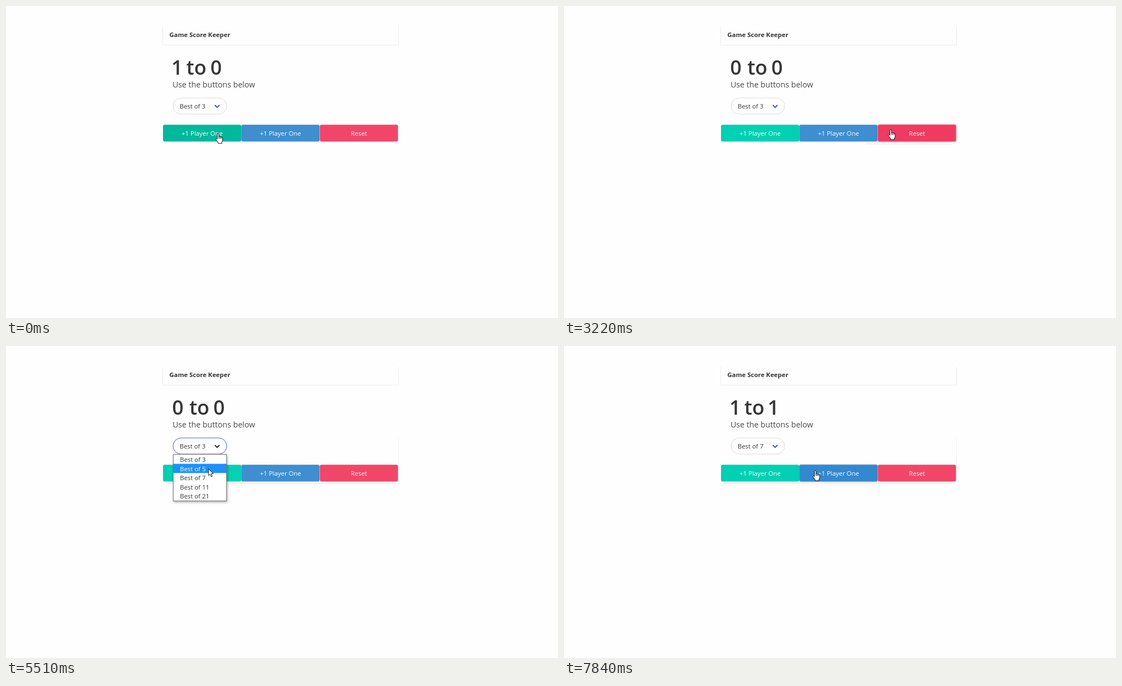
Write an HTML page that moves like this. It is 995x563 px and loops after 8 s.

```html
<!DOCTYPE html>
<html lang="en">
<head>
<meta charset="utf-8">
<title>Game Score Keeper</title>
<style>
html, body { margin: 0; height: 100%; overflow: hidden; background: #fefefe; }
svg { display: block; font-family: "Open Sans", "Noto Sans", sans-serif; font-size: 11.4px; fill: #363636; }
.title { font-size: 36px; font-weight: 600; }
.button text { fill: #fff; text-anchor: middle; }
.pointer { fill: #fff; stroke: #111; stroke-width: 1; stroke-linejoin: round; }
</style>
</head>
<body>
<svg id="stage" width="995" height="563" viewBox="0 0 995 563"></svg>
<script>
const LOOP = 8000;
const stage = document.getElementById('stage');

// Pointer positions: start time, x, y, shape; each holds until the next.
const path = [
  [0, 382.5, 230, 'hand'], [300, 384, 230, 'stop'], [1080, 394, 217, 'stop'],
  [1230, 436, 219, 'stop'], [1360, 497, 223, 'stop'], [1490, 556, 227, 'stop'],
  [1620, 594, 231, 'hand'], [1750, 605.5, 232.5, 'hand'], [3220, 589, 223, 'hand'],
  [3340, 540, 206, 'arrow'], [3480, 462, 190, 'arrow'], [3620, 404, 181, 'arrow'],
  [3750, 381, 178, 'hand'], [3880, 379, 178, 'arrow'], [4270, 377, 192, 'arrow'],
  [4390, 374, 207.5, 'arrow'], [4540, 371, 222, 'arrow'], [4690, 369, 240, 'arrow'],
  [4840, 368, 257, 'arrow'], [4980, 367, 267, 'arrow'], [5130, 366, 258, 'arrow'],
  [5270, 366, 243, 'arrow'], [5390, 365, 231, 'arrow'], [5510, 365, 221.5, 'arrow'],
  [5660, 365, 231, 'arrow'], [5800, 366, 238, 'arrow'], [6100, 366.5, 238.5, 'hand'],
  [7030, 371, 236, 'hand'], [7160, 386, 233, 'hand'], [7300, 414, 229, 'hand'],
  [7430, 441, 226, 'hand'], [7570, 453, 225, 'hand']
];

const scores = [[0, 1, 0], [160, 2, 0], [2560, 0, 0], [6750, 1, 0], [7840, 1, 1]];

const buttons = [
  { x: 283, label: '+1 Player One', colors: ['#00d1b2', '#00c4a7', '#00b89c'] },
  { x: 424.2, label: '+1 Player One', colors: ['#3e8ed0', '#3488ce', '#3082c5'] },
  { x: 565.6, label: 'Reset', colors: ['#f14668', '#f03a5f', '#ef2e55'] }
];

const shapes = {
  arrow: '<path d="M0 0V12.4L2.8 9.7 4.9 14.4 6.9 13.5 4.9 8.9H8.7Z"/>',
  hand: `<path d="M-1.6 10.4V1.4a1.4 1.4 0 0 1 2.8 0V6q1.2-1 2.4.2 1.2-.8 2.4.4 2-.4 2 1.4v4
    q0 2-1.6 4v2H-.2v-1.6L-4 11.6q-1-1.8.6-2.2 1 .2 1.8 1z"/><path d="M1.2 6v3.6M3.6 6.4v3.2M6 7v2.6"/>`,
  stop: '<g stroke="#d01018" stroke-width="2"><circle r="5.2"/><path d="M-3.6-3.6 3.6 3.6"/></g>'
};

const latest = (list, t) => list.findLast(item => item[0] <= t);
const during = (t, from, to) => t >= from && t < to;
const text = (x, y, content, attrs = '') => `<text x="${x}" y="${y}" ${attrs}>${content}</text>`;
const rect = (x, y, w, h, r, attrs) =>
  `<rect x="${x}" y="${y}" width="${w}" height="${h}" rx="${r}" ${attrs}/>`;
const line = (d, color, width = 1) =>
  `<path d="${d}" fill="none" stroke="${color}" stroke-width="${width}"/>`;

function card(t) {
  const full = t >= 3880;
  let out = line('M282.5 38V70.5H707.5V38', '#ededed');
  out += full
    ? '<path d="M284 243V245Q287 250.5 296 250.5H695Q705 250.5 706.5 245V243Z" fill="#f5f5f5"/>'
    : '<path d="M289 243V245L297 247H694L701 245V243Z" fill="#f2f2f2"/>';
  if (during(t, 3220, 3880)) out += '<path d="M544 247H704V248L699 250.5H544Z" fill="#f5f5f5"/>';
  if (full) out += line('M707.5 164V214', '#f3f3f3');
  return out + text(294.5, 56, 'Game Score Keeper', 'font-weight="700"')
    + text(300.2, 147, 'Use the buttons below', 'font-size="14.2" fill="#4a4a4a"');
}

function score(t) {
  const [, one, two] = latest(scores, t);
  const won = one === 2;
  const shift = one === 1 ? -5.3 : 0;
  const digit = (x, n, color) =>
    text(n === 1 ? x - 1.6 : x, 124, n, `class="title" fill="${won ? color : '#363636'}"`);
  return digit(299.6, one, '#48c78e') + text(330.4 + shift, 124, 'to', 'class="title"')
    + digit(373.8 + shift, two, '#f14668');
}

function select(t) {
  const focused = during(t, 3880, 6610);
  const hovered = during(t, 3620, 6100);
  const border = focused ? '#6475cf' : hovered ? '#b5b5b5' : '#dbdbdb';
  return (focused ? rect(300.2, 164.9, 98.6, 31.2, 15.6, 'fill="#d2d7f1"') : '')
    + rect(301.3, 166, 96.4, 29, 14.5, `fill="#fff" stroke="${border}"`)
    + text(313, 185, 'Best of ' + (t < 6100 ? 3 : 7))
    + line('M376.4 178.7l4.2 4.2 4.2-4.2', hovered ? '#363636' : '#485fc7', 2.1);
}

function button({ x, label, colors }, i, t, pointer) {
  const open = during(t, 3880, 6100);
  const disabled = i < 2 && during(t, 160, 2560);
  const over = !open && during(pointer[1], x, x + 141) && during(pointer[2], 214, 245);
  const pressed = [t < 160 || during(t, 6610, 6750), during(t, 7720, 7840), during(t, 2430, 2560)][i];
  const focused = [during(t, 6750, 7720), t >= 7840, during(t, 2690, 3880)][i];
  const fill = colors[disabled ? 0 : pressed ? 2 : over ? 1 : 0];
  const ring = focused
    ? rect(x - .7, 213.4, 142.4, 31.6, 3.7, `fill="none" stroke="${colors[0]}" stroke-opacity=".3" stroke-width="1.5"`)
    : '';
  return `<g class="button" opacity="${disabled ? .5 : 1}">${ring}`
    + rect(x, 214.2, 141, 30.2, 3, `fill="${fill}"`) + text(x + 70.6, 234, label) + '</g>';
}

function menu(t, pointer) {
  if (!during(t, 3880, 6100)) return '';
  const active = Math.max(0, Math.min(4, Math.floor((pointer[2] - 196) / 16.6)));
  const items = [3, 5, 7, 11, 21].map((n, i) => {
    const y = 196 + i * 16.6;
    return (i === active ? rect(302, y, 95, 16.6, 0, 'fill="#1e90ff"') : '')
      + text(313.5, y + 13, 'Best of ' + n, i === active ? 'fill="#fff"' : '');
  });
  return '<g style="filter:drop-shadow(1px 2px 2px #0005)">'
    + rect(301.5, 195.5, 96, 84, 0, 'fill="#fff" stroke="#767676"') + '</g>' + items.join('');
}

function scene(t) {
  const pointer = latest(path, t);
  const [, x, y, shape] = pointer;
  return card(t) + score(t) + select(t)
    + buttons.map((b, i) => button(b, i, t, pointer)).join('')
    + menu(t, pointer)
    + `<g class="pointer" transform="translate(${x} ${y})">${shapes[shape]}</g>`;
}

let shown = '';
function tick() {
  const markup = scene(performance.now() % LOOP);
  if (markup !== shown) stage.innerHTML = shown = markup;
  requestAnimationFrame(tick);
}
tick();
</script>
</body>
</html>
```
